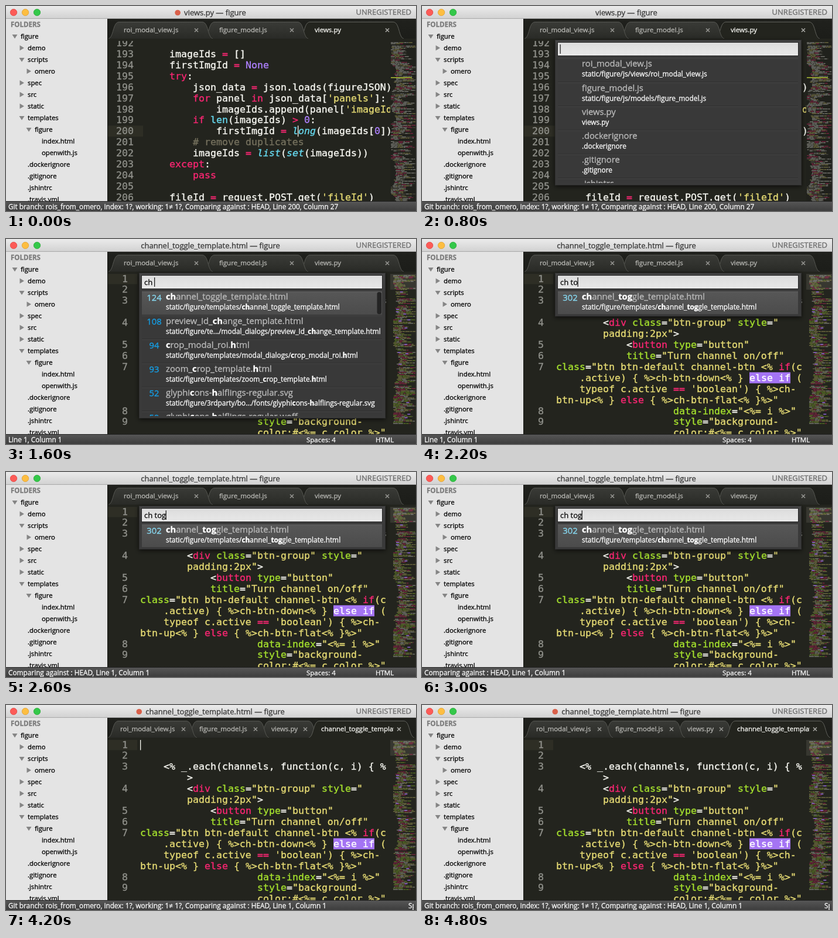
Animation of 700 by 352 pixels, one loop 5 s. Source, as an HTML page with a canvas:

```html
<!DOCTYPE html>
<html lang="en">
<head>
<meta charset="utf-8">
<title>Quick file switch</title>
<style>
html, body { margin: 0; width: 100%; height: 100%; overflow: hidden; background: #23241e; }
canvas { display: block; width: 700px; height: 352px; }
</style>
</head>
<body>
<canvas id="stage"></canvas>
<script>
const W = 700, H = 352, LOOP = 5000, STEP = 200;
const canvas = document.getElementById('stage');
const ratio = window.devicePixelRatio || 1;
canvas.width = W * ratio;
canvas.height = H * ratio;
const ctx = canvas.getContext('2d');
ctx.scale(ratio, ratio);

const UI = '"Open Sans", "Noto Sans", sans-serif';
const MONO = '"DejaVu Sans Mono", monospace';
const BG = '#23241e';
const COLORS = {
  w: '#f8f8f2', p: '#f92672', y: '#e6db74', g: '#a6e22e',
  c: '#66d9ef', i: '#66d9ef', u: '#ae81ff', k: '#75715e', s: '#ffffff'
};
const CHAR = 10, ROW = 18.92;

// Each line: number, column, then segments led by a colour letter.
const PY = [
  [192, 0, ''],
  [193, 4, 'wimageIds |p=|w []'],
  [194, 4, 'wfirstImgId |p=|w |uNone'],
  [195, 4, 'ptry|w:'],
  [196, 8, 'wjson_data |p=|w json.loads(figureJSON)'],
  [197, 8, 'pfor|w panel |pin|w json_data[|y\'panels\'|w]:'],
  [198, 12, 'wimageIds.append(panel[|y\'imageId\'|w])'],
  [199, 8, 'pif|w |clen|w(imageIds) |p>|w |u0|w:'],
  [200, 12, 'wfirstImgId |p=|w |ilong|w(imageIds[|u0|w])'],
  [201, 8, 'k# remove duplicates'],
  [202, 8, 'wimageIds |p=|w |ilist|w(|iset|w(imageIds))'],
  [203, 4, 'pexcept|w:'],
  [204, 8, 'ppass'],
  [205, 0, ''],
  [206, 4, 'wfileId |p=|w request.POST.get(|y\'fileId\'|w)']
];
const TEMPLATE = [
  [1, 0, ''],
  [2, 0, ''],
  [3, 4, 'w<% _.each(channels, function(c, i) { %'],
  [0, 8, 'w>'],
  [4, 8, 'w<|pdiv|w |gclass|w=|y"btn-group"|w |gstyle|w=|y"'],
  [0, 8, 'ypadding:2px"|w>'],
  [5, 12, 'w<|pbutton|w |gtype|w=|y"button"'],
  [6, 12, 'gtitle|w=|y"Turn channel on/off"'],
  [7, 0, 'gclass|w=|y"btn btn-default channel-btn <% |pif|y(c'],
  [0, 4, 'y.active) { %>ch-btn-down<% } |selse if|y ('],
  [0, 4, 'ytypeof c.active |p==|y \'boolean\') { %>ch-'],
  [0, 0, 'ybtn-up<% } |pelse|y { %>ch-btn-flat<% }%>"'],
  [8, 20, 'gdata-index|w=|y"<%= i %>"'],
  [9, 20, 'gstyle|w=|y"background-'],
  [0, 20, 'ycolor:#<%= c.color %>"']
];

// Name, depth, arrow: > closed, v open, blank for a file.
const TREE = [
  ['figure', 0, 'v'], ['demo', 1, '>'], ['scripts', 1, 'v'], ['omero', 2, '>'],
  ['spec', 1, '>'], ['src', 1, '>'], ['static', 1, '>'], ['templates', 1, 'v'],
  ['figure', 2, 'v'], ['index.html', 3, ''], ['openwith.js', 3, ''],
  ['.dockerignore', 1, ''], ['.gitignore', 1, ''], ['.jshintrc', 1, ''], ['.travis.yml', 1, '']
];

// Rank, title, path; asterisks wrap matched letters.
const RECENT = [
  ['', 'roi_modal_view.js', 'static/figure/js/views/roi_modal_view.js'],
  ['', 'figure_model.js', 'static/figure/js/models/figure_model.js'],
  ['', 'views.py', 'views.py'],
  ['', '.dockerignore', '.dockerignore'],
  ['', '.gitignore', '.gitignore'],
  ['', '.jshintrc', '.jshintrc']
];
const MATCHES = [
  ['124', '*ch*annel_toggle_template.html', 'static/figure/templates/*ch*annel_toggle_template.html'],
  ['108', 'preview_Id_*ch*ange_template.html', 'static/figure/te.../modal_dialogs/preview_Id_*ch*ange_template.html'],
  ['94', '*c*rop_modal_roi.*h*tml', 'static/figure/templates/modal_dialogs/*c*rop_modal_roi.*h*tml'],
  ['93', 'zoom_*c*rop_template.*h*tml', 'static/figure/templates/zoom_*c*rop_template.*h*tml'],
  ['52', 'glyphi*c*ons-*h*alflings-regular.svg', 'static/figure/3rdparty/bo.../fonts/glyphi*c*ons-*h*alflings-regular.svg'],
  ['52', 'glyphi*c*ons-*h*alflings-regular.woff', '']
];
const BEST = [
  ['302', '*ch*annel_*tog*gle_template.html', 'static/figure/templates/*ch*annel_*tog*gle_template.html']
];

function rect(x, y, w, h, fill) {
  ctx.fillStyle = fill;
  ctx.fillRect(x, y, w, h);
}

function fade(y0, y1, a, b) {
  const g = ctx.createLinearGradient(0, y0, 0, y1);
  g.addColorStop(0, a);
  g.addColorStop(1, b);
  return g;
}

function dot(x, y, r, fill, line) {
  ctx.beginPath();
  ctx.arc(x, y, r, 0, Math.PI * 2);
  ctx.fillStyle = fill;
  ctx.fill();
  if (line) {
    ctx.strokeStyle = line;
    ctx.lineWidth = 0.8;
    ctx.stroke();
  }
}

// A hairline stroke gives the heavier look of smoothed desktop text.
function text(str, x, y, size, fill, align = 'left', weight = '', family = UI) {
  ctx.font = `${weight} ${size}px ${family}`;
  ctx.fillStyle = ctx.strokeStyle = fill;
  ctx.lineWidth = 0.35;
  ctx.textAlign = align;
  ctx.fillText(str, x, y);
  ctx.strokeText(str, x, y);
  return ctx.measureText(str).width;
}

function clipped(x, y, w, h, draw) {
  ctx.save();
  ctx.beginPath();
  ctx.rect(x, y, w, h);
  ctx.clip();
  draw();
  ctx.restore();
}

function seeded(seed) {
  return () => (seed = (seed * 16807) % 2147483647) / 2147483647;
}

function titleBar(s) {
  rect(0, 0, W, 22, fade(0, 22, '#ebebeb', '#d1d1d1'));
  rect(0, 21, W, 1, '#a9a9a9');
  dot(13, 11, 5.7, '#fc5b57', '#df4744');
  dot(33, 11, 5.7, '#fdbe41', '#de9f34');
  dot(53, 11, 5.7, '#34c84a', '#27aa35');
  const name = (s.preview ? 'channel_toggle_template.html' : 'views.py') + ' — figure';
  const mid = s.icon ? 357 : 349;
  const width = text(name, mid, 15.5, 13, '#3c3c3c', 'center');
  if (s.icon) dot(mid - width / 2 - 11, 11.5, 4.8, '#d9604a');
  text('UNREGISTERED', 692, 15.3, 13.1, '#6f6f6f', 'right');
}

function sidebar() {
  rect(0, 22, 173, 314, '#e4e4e4');
  text('FOLDERS', 8, 36, 11.5, '#7d7d7d', 'left', 'bold');
  TREE.forEach(([name, depth, arrow], n) => {
    const x = 15 + depth * 12, y = 52 + n * 20;
    if (arrow) {
      ctx.beginPath();
      if (arrow === 'v') {
        ctx.moveTo(x - 4.5, y - 3);
        ctx.lineTo(x + 4.5, y - 3);
        ctx.lineTo(x, y + 4);
      } else {
        ctx.moveTo(x - 3.5, y - 4.5);
        ctx.lineTo(x + 4, y);
        ctx.lineTo(x - 3.5, y + 4.5);
      }
      ctx.fillStyle = '#858585';
      ctx.fill();
    }
    text(name, depth === 0 || arrow ? x + 10 : 25 + depth * 12, y + 4, 11.3, '#080808');
  });
  rect(173, 22, 1, 314, '#151612');
}

function tab(x, right, drop, name, labelX, closeX, active) {
  const top = 27.5 + drop, base = 56 + drop;
  ctx.beginPath();
  ctx.moveTo(x, base);
  ctx.bezierCurveTo(x + 9, base - 2, x + 7, top, x + 18, top);
  ctx.lineTo(right - 18, top);
  ctx.bezierCurveTo(right - 7, top, right - 9, base - 2, right, base);
  ctx.fillStyle = active ? BG : fade(27, 57, '#3a3b37', '#292a26');
  ctx.fill();
  ctx.strokeStyle = active ? '#61625c' : '#565752';
  ctx.lineWidth = 1;
  ctx.stroke();
  clipped(labelX, 22, closeX - labelX - 9, 36, () => {
    text(name, labelX, 45 + drop, 11.5, active ? '#f4f4f0' : '#b3b3af');
  });
  const y = 41.5 + drop;
  ctx.beginPath();
  ctx.moveTo(closeX - 3, y - 3);
  ctx.lineTo(closeX + 3, y + 3);
  ctx.moveTo(closeX + 3, y - 3);
  ctx.lineTo(closeX - 3, y + 3);
  ctx.strokeStyle = active ? '#a5a5a1' : '#92928e';
  ctx.lineWidth = 1.7;
  ctx.stroke();
}

function tabBar(s) {
  rect(174, 22, 526, 36, fade(22, 58, '#20211d', '#1c1d19'));
  const mix = (a, b) => a + (b - a) * s.shrink;
  const tabs = [
    ['roi_modal_view.js', mix(201, 195), mix(325, 303)],
    ['figure_model.js', mix(364, 330), mix(488, 426)],
    ['views.py', mix(527, 453), mix(651, 511)]
  ];
  const pad = mix(26, 21);
  clipped(174, 22, 526, 35, () => {
    for (let n = 2; n >= 0; n--) {
      const [name, label, close] = tabs[n];
      tab(label - pad, close + pad + 2, 0, name, label, close, n === 2 && !s.preview);
    }
    if (s.rise > 0) {
      tab(517, 697, (1 - s.rise) * 24, 'channel_toggle_template.html', 538, 671, true);
    }
  });
  rect(174, 56, 526, 4, BG);
}

function code(lines, origin, first, s) {
  const html = lines === TEMPLATE;
  const current = html ? 0 : 8;
  const top = n => first + n * ROW - 9;
  rect(174, top(current), origin - 179, 19, '#2e2e25');
  lines.forEach(([num, col, parts], n) => {
    const base = first + n * ROW + 6;
    if (num) text(num, origin - 21, base, 16.6, '#90918b', 'right', '', MONO);
    let x = origin + col * CHAR;
    for (const part of parts.split('|')) {
      const key = part[0], str = part.slice(1);
      if (!str) continue;
      if (key === 's') rect(x, top(n), str.length * CHAR, 19, '#a474f4');
      text(str, x, base, 16.6, COLORS[key], 'left', key === 'i' ? 'italic' : '', MONO);
      x += str.length * CHAR;
    }
  });
  if (s.caret) rect(html ? 229 : 498, top(current), 1.3, 19, '#f8f8f0');
}

function minimap(html) {
  rect(656, 58, 44, 278, html ? BG : '#20211c');
  if (html) rect(656, 58, 44, 29, '#373730');
  const rnd = seeded(html ? 4127 : 911);
  const end = html ? 318 : 336;
  const inks = html
    ? ['#e6db74', '#e6db74', '#a6e22e', '#f8f8f2', '#f92672']
    : ['#f8f8f2', '#f8f8f2', '#f8f8f2', '#e6db74', '#75715e', '#f92672'];
  let indent = 2;
  for (let y = 60; y < end; y += 2) {
    if (rnd() < 0.08) continue;
    indent += (rnd() - 0.5) * 8;
    indent = Math.max(html ? 5 : 1, Math.min(html ? 17 : 10, indent));
    let x = 656 + indent;
    const stop = Math.min(699, x + 12 + rnd() * 30);
    ctx.globalAlpha = 0.36;
    while (x < stop) {
      const w = Math.min(2 + rnd() * 7, stop - x);
      rect(x, y, w, 1.5, inks[Math.floor(rnd() * inks.length)]);
      x += w + 0.7;
    }
    ctx.globalAlpha = 1;
    if (html && rnd() < 0.1) rect(664 + rnd() * 25, y, 5, 1.6, '#8a62cf');
  }
  if (!html) rect(657, 122, 36, 2, '#8f9d30');
}

function marked(str, x, y, size, fill, bold) {
  str.split('*').forEach((part, n) => {
    if (part) x += text(part, x, y, size, n % 2 ? bold : fill, 'left', n % 2 ? 'bold' : '');
  });
}

function popup(s) {
  const rows = s.query.length > 3 ? BEST : s.query ? MATCHES : RECENT;
  const bottom = rows === BEST ? 133 : 308;
  ctx.save();
  ctx.shadowColor = 'rgba(0,0,0,.65)';
  ctx.shadowBlur = 8;
  ctx.shadowOffsetY = 2;
  rect(227, 58, 421, bottom - 58, '#3a3a3a');
  ctx.restore();
  rect(227, 58, 421, 32, fade(58, 90, '#454545', '#3b3b3b'));
  ctx.strokeStyle = '#303030';
  ctx.lineWidth = 1;
  ctx.strokeRect(227.5, 58.5, 420, bottom - 59);
  rect(231, 62, 412, 24, '#262626');
  rect(232, 63, 410, 22, fade(63, 85, '#dcdcdc', '#e8e8e8'));
  const end = 235.5 + text(s.query, 236, 78.5, 13, '#101010');
  rect(end, 66, 1.2, 16, '#111111');

  clipped(232, 89, 410, bottom - 93, () => {
    rows.forEach(([rank, title, path], n) => {
      const y = 90 + n * 41.2;
      const chosen = n === 0 && rank;
      rect(232, y, 410, 41.2, chosen ? fade(y, y + 41, '#575757', '#4b4b4b') : '#393939');
      rect(232, y, 410, 1, chosen ? '#606060' : '#454545');
      rect(232, y + 40.2, 410, 1, '#2e2e2e');
      text(rank, 253, y + 15.5, 14.75, chosen ? '#87d8f0' : '#159fe6', 'center');
      marked(title, 273, y + 14.3, 14.75, '#b9b9b9', '#ffffff');
      marked(path, 273, y + 31.3, 11.85, '#f8f8f8', '#ffffff');
    });
    if (rows === MATCHES) {
      ctx.beginPath();
      ctx.roundRect(633.5, 91, 7.5, 38, 3.5);
      ctx.fillStyle = '#242424';
      ctx.fill();
    }
  });
}

function statusBar(s) {
  rect(0, 335, W, 17, fade(336, 352, '#565656', '#3d3d3d'));
  rect(0, 335, W, 1, '#222222');
  const place = s.preview ? 'Line 1, Column 1' : 'Line 200, Column 27';
  const compare = s.compare ? 'Comparing against : HEAD, ' : '';
  const branch = s.branch ? 'Git branch: rois_from_omero, index: 1?, working: 1≠ 1?, ' : '';
  text(branch + compare + place, 4, 349, 11.8, '#f6f6f6');
  if (s.branch) {
    if (s.preview) clipped(686, 336, 10, 16, () => text('Spaces: 4', 687, 349, 11.8, '#f6f6f6'));
  } else {
    text('Spaces: 4', 513, 349, 11.5, '#f6f6f6');
    text('HTML', 631, 349, 11.5, '#f6f6f6');
  }
}

function typed(t) {
  const keys = [[1200, 1], [1400, 2], [1600, 3], [2000, 4], [2200, 5], [2400, 6]];
  return 'ch tog'.slice(0, keys.reduce((n, [at, len]) => t >= at ? len : n, 0));
}

function stateAt(t) {
  const open = t >= 800 && t < 3200;
  const preview = t >= 1200;
  return {
    open, preview,
    icon: !open,
    query: typed(t),
    compare: !preview || t >= 2400,
    branch: !preview || t >= 3200,
    shrink: t < 3200 ? 0 : t < 3400 ? 0.6 : 1,
    rise: Math.max(0, Math.min(1, (t - 3200) / 400)),
    caret: !open && (t < 800 || (t - 3200) % 1000 < 500)
  };
}

function draw(now) {
  const t = Math.floor((now % LOOP) / STEP) * STEP;
  const s = stateAt(t);
  ctx.textBaseline = 'alphabetic';
  ctx.lineJoin = 'round';
  rect(0, 0, W, H, BG);
  clipped(174, 58, 482, 278, () => {
    if (s.preview) code(TEMPLATE, 229, 67.5, s);
    else code(PY, 239, 63, s);
  });
  minimap(s.preview);
  tabBar(s);
  sidebar();
  if (s.open) popup(s);
  titleBar(s);
  statusBar(s);
}

const start = performance.now();
function tick() {
  draw(performance.now() - start);
  requestAnimationFrame(tick);
}
tick();
</script>
</body>
</html>
```
